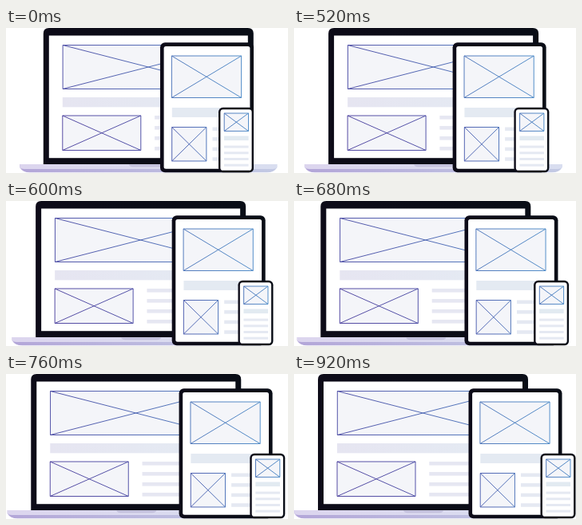
These frames come from a looping animation (353 by 182 pixels, 960 ms). An HTML page:

```html
<!DOCTYPE html>
<html lang="en">
<head>
<meta charset="utf-8">
<title>Responsive devices</title>
<style>
html, body { margin: 0; width: 100%; height: 100%; overflow: hidden; background: #fff; }
svg { display: block; width: 100vw; height: 100vh; }
</style>
</head>
<body>
<svg viewBox="0 0 353 182">
  <defs>
    <linearGradient id="body"><stop stop-color="#0d0b18"/><stop offset="1" stop-color="#090d16"/></linearGradient>
    <linearGradient id="deck"><stop stop-color="#dcd5ee"/><stop offset="1" stop-color="#d9def0"/></linearGradient>
    <linearGradient id="under"><stop stop-color="#b3a6d8"/><stop offset="1" stop-color="#c3cae4"/></linearGradient>
    <linearGradient id="violet"><stop stop-color="#4d429f"/><stop offset="1" stop-color="#4a4aa4"/></linearGradient>
    <linearGradient id="indigo"><stop stop-color="#4b4ca5"/><stop offset="1" stop-color="#4a7cbf"/></linearGradient>
    <linearGradient id="blue"><stop stop-color="#4b74b9"/><stop offset="1" stop-color="#4a88c6"/></linearGradient>
    <linearGradient id="mid"><stop stop-color="#4a5cae"/><stop offset="1" stop-color="#4a70b8"/></linearGradient>
    <linearGradient id="bar"><stop stop-color="#e6e5f1"/><stop offset="1" stop-color="#e4ebf3"/></linearGradient>
  </defs>
  <g id="laptop"></g>
  <g id="tablet"></g>
  <g id="phone"></g>
</svg>
<script>
const $ = id => document.getElementById(id);

const rect = (x, y, w, h, fill, r = 0) =>
  `<rect x="${x}" y="${y}" width="${w}" height="${h}" rx="${r}" fill="${fill}"/>`;

// Image placeholder: a framed box with both diagonals
const image = (x, y, w, h, ink) =>
  `<path d="M${x} ${y}h${w}v${h}h${-w}zl${w} ${h}m0 ${-h}l${-w} ${h}" fill="#f4f5f9" stroke="url(#${ink})" stroke-width=".95"/>`;

const lines = (x, y, w, h, gap, fill) =>
  [0, 1, 2, 3].map(i => rect(x, y + i * gap, w, h, fill)).join('');

// Each device is drawn from its own left edge
$('laptop').innerHTML =
  '<path d="M0 172V7Q0 0 7 0H256Q263 0 263 7V172Z" fill="url(#body)"/>' +
  rect(7, 9.5, 249, 153.7, '#fff') +
  '<path d="M-29.5 171H292.5V175Q289 181.3 280 181.3H-17Q-26 181.3 -29.5 175Z" fill="url(#under)"/>' +
  '<path d="M-29.5 171H292.5V175Q291 177 287 177H-24Q-28 177 -29.5 175Z" fill="url(#deck)"/>' +
  '<path d="M107 171.5H157Q156 174.3 152 174.3H112Q108 174.3 107 171.5Z" fill="#c2bfdc"/>' +
  image(24.3, 21.5, 214, 55, 'indigo') +
  rect(24, 87, 214.5, 12.3, 'url(#bar)') +
  image(24, 110, 98, 43.5, 'violet') +
  lines(139.3, 110, 99, 4.6, 13, '#e6e7f2');

$('tablet').innerHTML =
  rect(0, 18.3, 117, 162.9, 'url(#body)', 6) +
  rect(4.6, 23, 107.8, 153.8, '#fff', 2.5) +
  image(14.4, 35, 87.2, 52.5, 'blue') +
  rect(14.8, 100, 87, 12, '#e4eaf2') +
  image(14.7, 124.5, 43.2, 42.5, 'mid') +
  lines(65.5, 124.5, 36.5, 4.5, 12.6, '#e5e9f2');

$('phone').innerHTML =
  rect(0, 99.8, 44, 81.5, 'url(#body)', 5.5) +
  rect(2.4, 102.3, 39.2, 76.5, '#fff', 3.4) +
  image(7.2, 107, 30.3, 22.4, 'blue') +
  rect(7, 135.5, 30.6, 5.6, '#e2eaf1') +
  lines(7, 147.6, 30.6, 3, 7.7, '#e5e9f2');

const LOOP = 960, HOLD = 480, STEP = 40, STEPS = 12;

// cubic-bezier(.25, .1, .25, 1)
function ease(x) {
  if (x <= 0 || x >= 1) return x <= 0 ? 0 : 1;
  const curve = (a, b, s) => 3 * a * s * (1 - s) ** 2 + 3 * b * s * s * (1 - s) + s ** 3;
  let lo = 0, hi = 1;
  for (let i = 0; i < 30; i++) {
    const s = (lo + hi) / 2;
    if (curve(.25, .25, s) < x) lo = s; else hi = s;
  }
  return curve(.1, 1, lo);
}

function place(id, from, to, p) {
  $(id).setAttribute('transform', `translate(${(from + (to - from) * p).toFixed(2)} 0)`);
}

function draw(ms) {
  const t = ms % LOOP;
  const step = t < HOLD ? 0 : Math.floor((t - HOLD) / STEP) + 1;
  const p = ease(step / STEPS);
  place('laptop', 46.8, 30, p);
  place('tablet', 193, 218.5, p);
  place('phone', 266, 308.5, p);
}

const start = performance.now();
function tick() {
  draw(performance.now() - start);
  requestAnimationFrame(tick);
}
tick();
</script>
</body>
</html>
```
